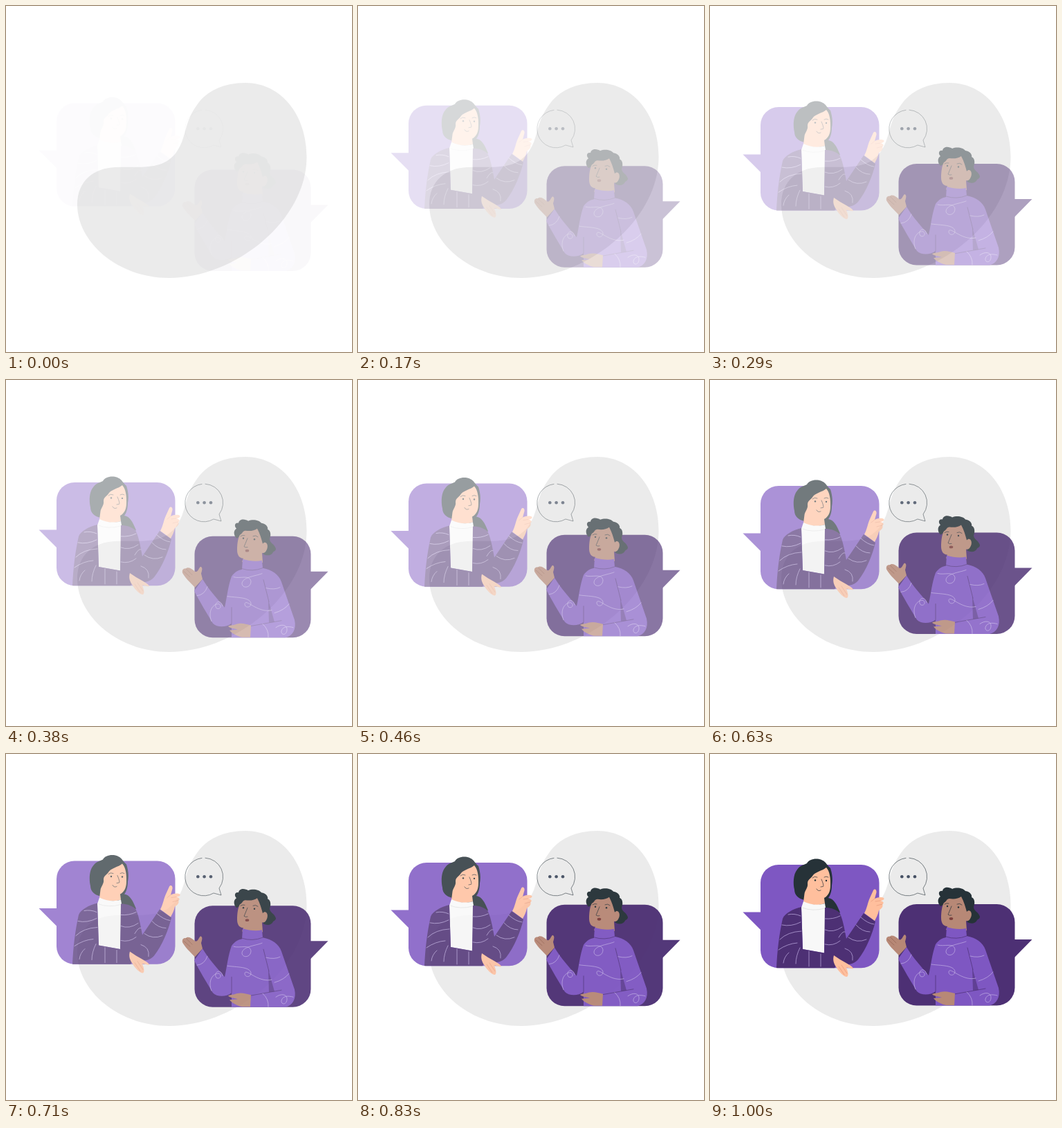
An HTML page for the animation above (1040 ms loop, 500 by 500 pixels).

```html
<!DOCTYPE html>
<html>
<head>
<meta charset="utf-8">
<style>
  html, body { margin: 0; width: 100%; height: 100%; overflow: hidden; background: #fff; }
  svg { display: block; width: 100vw; height: 100vh; }
  .violet { fill: #7e57c2; }
  .plum { fill: #4d3074; }
  .dark { fill: #263238; }
  .peach { fill: #ffbf9d; }
  .brown { fill: #b78876; }
  .line { fill: none; stroke-width: .7; stroke-linecap: round; stroke-linejoin: round; }
  .ink { stroke: #263238; }
  .thread { stroke: #c3b0e6; }
</style>
</head>
<body>
<svg viewBox="0 0 500 500">
  <path fill="#ebebeb" d="M346 111C398 111 434.500 158 434.500 218C434.500 310 331 393 236 393C160 393 103 340 103 287C103 252 128 234 158 233C200 232 225 237 245 213C262 190 256 170 276 143C290 122 316 111 346 111Z"/>

  <g id="woman">
    <rect class="violet" x="73" y="160" width="171.5" height="149.300" rx="26"/>
    <path class="violet" d="M47.500 228.500H74V255Z"/>
    <path class="dark" d="M140 158C144 150 160 149 167 157C169 160 171 162 174 165C176 171 178 180 176 190C176 198 174 204 171 208C179 209 183 217 188 229C182 233 174 230 166 225L136 211C128 209 122 204 122 196C120 188 120 174 126 167C130 161 136 160 140 158Z"/>
    <path class="peach" d="M168 164C162 169 153 170 149 175C146 180 141 181 141 187C142 193 137 197 136.500 202L135 214C144 219 158 219 166 216L165 208C171 205 174 198 174 190C174.500 180 173 169 168 164Z"/>
    <path class="line ink" d="M148 179Q151 176 155 178M165 178Q168 176 171 178M161 181Q165 190 163.500 191.500L160 192M154 195Q156 199 160 197"/>
    <g class="dark"><circle cx="152" cy="182.500" r="1.200"/><circle cx="168" cy="183" r="1.200"/></g>
    <path fill="#f8f8f8" d="M135 213C145 218 157 219 166 216L167 222L165 287.500L134 282L132 222Z"/>
    <path class="line" stroke="#dcdcdc" d="M133 222Q148 228 166 223"/>
    <path class="plum" d="M132 221C120 224 108 230 105 238C100 260 97 285 96 309.300H180L186 300C192 306 206 306 214 297C226 282 235 259 239 242L222 230L197 267C194 250 191 236 187 229C180 223 172 222 166 222L165 287.500L134 282Z"/>
    <path class="line thread" d="M113 232Q122 230 131 234M104 247Q117 250 131 243M101 268Q112 257 132 256M99 283Q112 274 126 273M124 303Q124 292 130 280M143 285V307M160 289V307M106 302Q107 293 114 287M166 238Q178 239 188 234M166 254Q178 259 191 250M166 275Q178 278 188 270M186 265Q192 255 195 257M200 265Q212 274 226 268M211 247Q220 257 231 257M195 281Q208 285 206 298M218 236Q228 245 237 246"/>
    <path class="peach" d="M223 230C227 223 228 214 231 208L236 197C238 194 241 196 240.500 200L238 209C242 207 248 206 251 208C253 210 249 212 246 212C251 213 252 216 249 217C251 221 247 224 244 226C243 232 240 237 238 241Z"/>
    <path class="line" stroke="#e59a7b" d="M238 209L233 213M246 212L239 213M249 217L241 219"/>
    <path class="peach" d="M179 291L188 297C196 302 206 306 207 310C204 311 200 308 197 309C199 314 201 320 198 322C193 322 186 314 183 309C179 303 177 298 179 291Z"/>
    <path class="line" stroke="#e59a7b" d="M186 307L194 319M190 305L198 317"/>
  </g>

  <g id="man">
    <rect class="plum" x="272.500" y="217" width="168" height="146.500" rx="26"/>
    <path class="plum" d="M439 268H465.500L439 295Z"/>
    <path class="dark" d="M333 220C329 216 328 209 333 206C329 202 331 197 336 198C337 191 346 192 350 195C357 192 366 194 369 198C377 199 379 205 378 207C383 209 383 216 381 221C381 227 388 228 390 235C390 238 387 239 386 240C384 245 377 246 372 243L362 215L345 214Z"/>
    <path class="brown" d="M338 215C342 213 342 209 346 209C353 210 359 209 363 206C367 213 369 221 371 228C375 223 380 229 377 236C375 241 372 242 370 241L371 255C360 258 350 256 341 254L343 249C337 249 334 244 334 237C334 229 335 220 338 215Z"/>
    <path class="line ink" d="M339 217Q342 215 345 216M357 217Q361 215 364 218M349 220Q345 230 344 232Q346 234 349 233"/>
    <g class="dark"><circle cx="343" cy="220" r="1.200"/><circle cx="359" cy="221.500" r="1.200"/></g>
    <ellipse cx="348.500" cy="238" rx="2.800" ry="1.900" fill="#7c3f3c"/>
    <path class="violet" d="M342 250C352 253 362 254 370 252L371 263C385 266 394 272 398 283L417 338C420 352 414 361 404 363.500H326V343C318 349 305 349 299 343C290 328 279 310 272 296L284 279C293 294 305 307 316 320C319 307 321 288 326 275C331 268 336 266 341 265Z"/>
    <path class="plum" d="M379 309L388 341L380 342Z" opacity=".6"/>
    <path class="line" stroke="#4d3074" d="M353 347L398 339M326 343V320M341 264Q356 269 371 263M372 280L380 312"/>
    <path class="line thread" d="M329 276C338 279 352 272 354 282C354 292 342 293 341 286C341 276 360 275 370 271M320 304C334 306 352 305 354 314C354 321 345 321 345 315C346 306 364 329 384 324M376 292Q388 295 396 291M388 328Q402 324 409 315M371 344Q380 352 379 363M390 349C398 343 407 345 406 353C405 361 397 360 398 354C400 347 408 347 415 349M276 303Q287 302 291 290M297 340C291 326 299 314 308 315C313 319 308 324 304 321C299 314 310 306 313 318"/>
    <path class="brown" d="M273 291C266 284 258 276 255 270C254 265 257 263 260 264C262 261 268 263 273 268C277 270 278 264 281 261C285 262 283 267 282 271L284 279Z"/>
    <path class="line" stroke="#946454" d="M260 264L269 273M257 268L266 276"/>
    <path class="brown" d="M354 346L353 363H341C333 361 326 357 323 353L335 352C329 350 323 350 321 347C325 345 329 346 333 344C340 342 347 344 354 346Z"/>
  </g>

  <g id="chat">
    <path class="line ink" stroke-opacity=".85" d="M288 150.200A27.300 27.300 0 0 1 308 194L311 204L300 201A27.300 27.300 0 1 1 283 150.400"/>
    <g fill="#455063"><circle cx="277.300" cy="177.300" r="2.300"/><circle cx="286.600" cy="177.300" r="2.300"/><circle cx="296" cy="177.300" r="2.300"/></g>
  </g>
</svg>
<script>
  const LOOP = 1040, FADE = 1000, LEAD = 15, SLIDE = 20;
  const [woman, man, chat] = ["woman", "man", "chat"].map(id => document.getElementById(id));

  // cubic-bezier(0, 0, .58, 1), solved for x by bisection
  function easeOut(x) {
    let low = 0, high = 1, s = .5;
    for (let i = 0; i < 20; i++) {
      s = (low + high) / 2;
      if (3 * (1 - s) * s * s * .58 + s ** 3 < x) low = s; else high = s;
    }
    return 3 * (1 - s) * s * s + s ** 3;
  }

  function pose(part, opacity, dy) {
    part.setAttribute("opacity", opacity);
    part.setAttribute("transform", `translate(0 ${dy})`);
  }

  const start = performance.now();
  function draw() {
    const t = (performance.now() - start) % LOOP;
    const p = Math.min(1, (t + LEAD) / FADE), e = easeOut(p);
    pose(woman, p, -SLIDE * (1 - p));
    pose(man, e, SLIDE * (1 - e));
    pose(chat, e, 0);
    requestAnimationFrame(draw);
  }
  draw();
</script>
</body>
</html>
```
